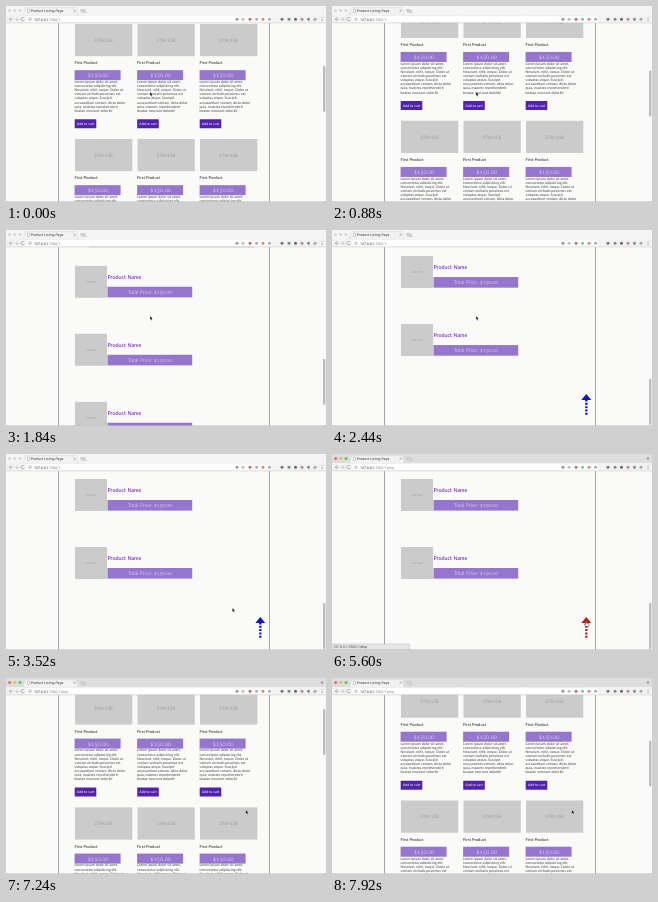
These frames come from a looping animation (320x196 px, 8 s). An HTML page:

```html
<!DOCTYPE html>
<html lang="en">
<head>
<meta charset="utf-8">
<title>Product Listing Page</title>
<style>
  html, body { margin: 0; width: 100%; height: 100%; overflow: hidden; background: #fafaf9; }
  svg { display: block; width: 320px; height: 196px; text-rendering: geometricPrecision; }
  text { font-family: Lato, "Open Sans", sans-serif; white-space: pre; }
  .price { font-weight: 300; font-variant-numeric: oldstyle-nums; }
  .ui text { font-family: Roboto, Arial, sans-serif; font-size: 3.5px; }
</style>
</head>
<body>
<svg viewBox="0 0 320 196">
  <rect width="320" height="196" fill="#fafaf9"/>
  <path d="M52.5 17V196M263.5 17V196" stroke="#908e95" stroke-width=".8"/>
  <g id="page"></g>
  <g class="ui">
    <rect id="thumb" x="317" width="2.4" height="46" rx="1.2" fill="#bcbcbc"/>
    <g id="status">
      <path d="M0 190H77.5V196H0Z" fill="#e6e6e6" stroke="#bbb" stroke-width=".5"/>
      <text x="1.2" y="194.4" fill="#444">127.0.0.1:5500/1#top</text>
    </g>
    <g id="chrome"></g>
  </g>
  <path d="M0 195.6H320" stroke="#c4c4c2" stroke-width=".7"/>
  <path id="pointer" d="M0 0V3.8L.9 3L1.6 4.5L2.3 4.2L1.7 2.8H2.8Z" stroke="#fff" stroke-width=".3"/>
  <path id="hand" d="M-.5 0H.5V2L2.6 2.6V4.2L2 5.6H-.7L-1.9 3.4L-1.3 2.9L-.5 3.5Z" fill="#fff" stroke="#222" stroke-width=".5"/>
</svg>
<script>
const LOOP = 8000, TOP = 17, BOTTOM = 512, FOCUS = 3840, CLICK = 5520;
const $ = id => document.getElementById(id);

const rect = (x, y, w, h, fill, rx = 0) =>
  `<rect x="${x}" y="${y}" width="${w}" height="${h}" rx="${rx}" fill="${fill}"/>`;
const text = (s, x, y, size, fill, more = '') =>
  `<text x="${x}" y="${y}" font-size="${size}" fill="${fill}" ${more}>${s}</text>`;
const dot = (x, y, r, fill) => `<circle cx="${x}" cy="${y}" r="${r}" fill="${fill}"/>`;
const middle = 'text-anchor="middle"';
const price = middle + ' class="price"';

const LOREM = ['Lorem ipsum dolor sit amet,', 'consectetur adipisicing elit.',
  'Nesciunt, nihil, neque. Dolor ut', 'veniam veritatis possimus est',
  'voluptas atque. Suscipit', 'accusantium veniam, dicta dolor',
  'quia, maiores reprehenderit', 'beatae nesciunt dolorib!'];

function product(x, y) {
  return rect(x, y, 57.3, 32.2, '#cbcbcb') +
    text('378×158', x + 28.4, y + 17.8, 4.6, '#999', middle) +
    text('First Product', x - .4, y + 40.4, 4.05, '#222') +
    rect(x - .4, y + 46.2, 46, 10, '#9575cd') +
    text('$150.00', x + 23.2, y + 53.4, 6, '#fff', price) +
    LOREM.map((s, i) => text(s, x - .4, y + 59.1 + i * 4.1, 3.6, '#444')).join('') +
    rect(x - .3, y + 95.2, 21.6, 9, '#5222aa', .5) +
    text('Add to cart', x + 10.6, y + 100.9, 3.55, '#fff', middle);
}

function cartItem(y) {
  return rect(69, y, 32, 32, '#cbcbcb') +
    text('150×150', 85, y + 16.9, 2.6, '#999', middle) +
    text('Product Name', 101.4, y + 12.8, 5.4, '#5e10a8') +
    rect(101.5, y + 21, 84.7, 10.6, '#9575cd') +
    text('Total Price: $150.00', 143.9, y + 28.3, 5.25, '#fff', price);
}

// Page content, laid out as it stands on the stage at scroll 0.
let page = '';
for (const y of [69, 184, 299])
  for (let col = 0; col < 3; col++) page += product(69 + col * 62.5, y);
page += '<path d="M83 450H248" stroke="#666" stroke-width=".6"/>';
for (const y of [469, 537, 605]) page += cartItem(y);
page += '<g id="arrow"><path d="M254.3 675L259.3 680.9H255.5V682.4H253.1V680.9H249.3Z"/>';
for (let y = 683.8; y < 694; y += 3.3) page += `<rect x="253.1" y="${y}" width="2.4" height="2" rx=".4"/>`;
$('page').innerHTML = page + '</g>';

// Browser window
let bar = '<rect id="strip" width="320" height="9.4"/>' + rect(0, 9.2, 320, 7.6, '#f2f2f2') +
  '<path d="M17 9.4L19.5 1.6H70L72.5 9.4Z" fill="#f2f2f2" stroke="#c2c2c2" stroke-width=".3"/>' +
  rect(16.5, 9.2, 56, 1, '#f2f2f2') +
  rect(20.5, 10.3, 245, 5.8, '#fff', 1) +
  '<path d="M74 3.6H79L80.5 6.8H75.5Z" fill="#d2d2d2" stroke="#b5b5b5" stroke-width=".3"/>' +
  '<path d="M0 16.9H320" stroke="#c6c6c6" stroke-width=".5"/>';
const LIGHTS = ['#ee6b60', '#f2bd4e', '#62c554'];
const lights = fill => LIGHTS.map((c, i) => dot(3.6 + i * 5.2, 4.6, 1.5, fill || c)).join('');
bar += lights('#d6d6d6') + `<g id="focused">${lights()}${dot(316, 4.5, 1.3, '#999')}</g>` +
  '<path d="M21.5 3.2H23.8V6.4H21.5Z" fill="#fff" stroke="#888" stroke-width=".4"/>' +
  text('Product Listing Page', 25, 6, 3.5, '#333') +
  '<g fill="none" stroke="#777" stroke-width=".5">' +
  '<path d="M67.6 3.7l2 2m0-2l-2 2M5.2 11.4L3.4 13.2L5.2 15M3.4 13.2H6.6"/>' +
  '<path stroke="#aaa" d="M10.4 11.4l1.8 1.8l-1.8 1.8M12.2 13.2H9"/>' +
  '<path d="M18 12.2A1.7 1.7 0 1 0 18.2 13.8"/><circle cx="24" cy="13.2" r="1.3"/></g>' +
  '<text x="28" y="14.5" fill="#222">127.0.0.1<tspan fill="#888">:5500/1</tspan>' +
  '<tspan id="hash" fill="#888">#top</tspan></text>';
const ICONS = [[231, '#999'], [237, '#bbb'], [244, '#c9685e'], [250.5, '#aaa'], [257, '#d08a68'],
  [263.5, '#aaa'], [276, '#777'], [283, '#7d8496'], [289.5, '#666'], [296, '#b58aa0'],
  [302.5, '#888'], [309, '#aaa']];
for (const [x, c] of ICONS) bar += dot(x, 13.2, 1.5, c);
for (const y of [11.7, 13.2, 14.7]) bar += dot(316, y, .45, '#666');
$('chrome').innerHTML = bar;

// Motion: [time, values..., easing into this key]
const line = u => u, out = u => 1 - (1 - u) ** 2, smooth = u => u * u * (3 - 2 * u);
const SCROLL = [[0, 166], [880, 184, line], [1840, 433, line], [2520, BOTTOM, out],
  [5600, BOTTOM, line], [6800, 0, smooth], [7000, 0, line], [7240, 54, line],
  [7520, 140, out], [7720, 140, line], [7920, 176.5, out], [LOOP, 176.5, line]];
const MOUSE = [[0, 144, 86], [2540, 144, 86, line], [2840, 214, 148, smooth],
  [3000, 214, 148, line], [3480, 226.3, 154, smooth], [3540, 226.3, 154, line],
  [3860, 254.3, 167, smooth], [6360, 254.3, 167, line], [6840, 239.8, 132, smooth],
  [LOOP, 239.8, 132, line]];

function at(keys, t, n = 1) {
  const i = keys.findIndex(k => k[0] > t), a = keys[i - 1], b = keys[i];
  const u = b[b.length - 1]((t - a[0]) / (b[0] - a[0]));
  return a[n] + (b[n] - a[n]) * u;
}

const show = (id, on) => $(id).setAttribute('visibility', on ? 'visible' : 'hidden');
const move = (id, x, y) => $(id).setAttribute('transform', `translate(${x} ${y})`);

function draw(now) {
  const t = now % LOOP, scroll = at(SCROLL, t), focused = t >= FOCUS;
  const x = at(MOUSE, t, 1), y = at(MOUSE, t, 2), docY = y + scroll;
  const hover = x > 249 && x < 260 && docY > 674 && docY < 695;
  move('page', 0, -scroll);
  $('thumb').setAttribute('y', TOP + scroll * 132 / BOTTOM);
  $('arrow').setAttribute('fill', hover ? '#c01818' : '#1414c8');
  $('strip').setAttribute('fill', focused ? '#dedede' : '#f5f5f5');
  show('focused', focused);
  show('status', hover);
  show('hash', t >= CLICK);
  show('hand', hover);
  show('pointer', !hover);
  move('hand', x, y);
  move('pointer', x, y);
  requestAnimationFrame(draw);
}
requestAnimationFrame(draw);
</script>
</body>
</html>
```
